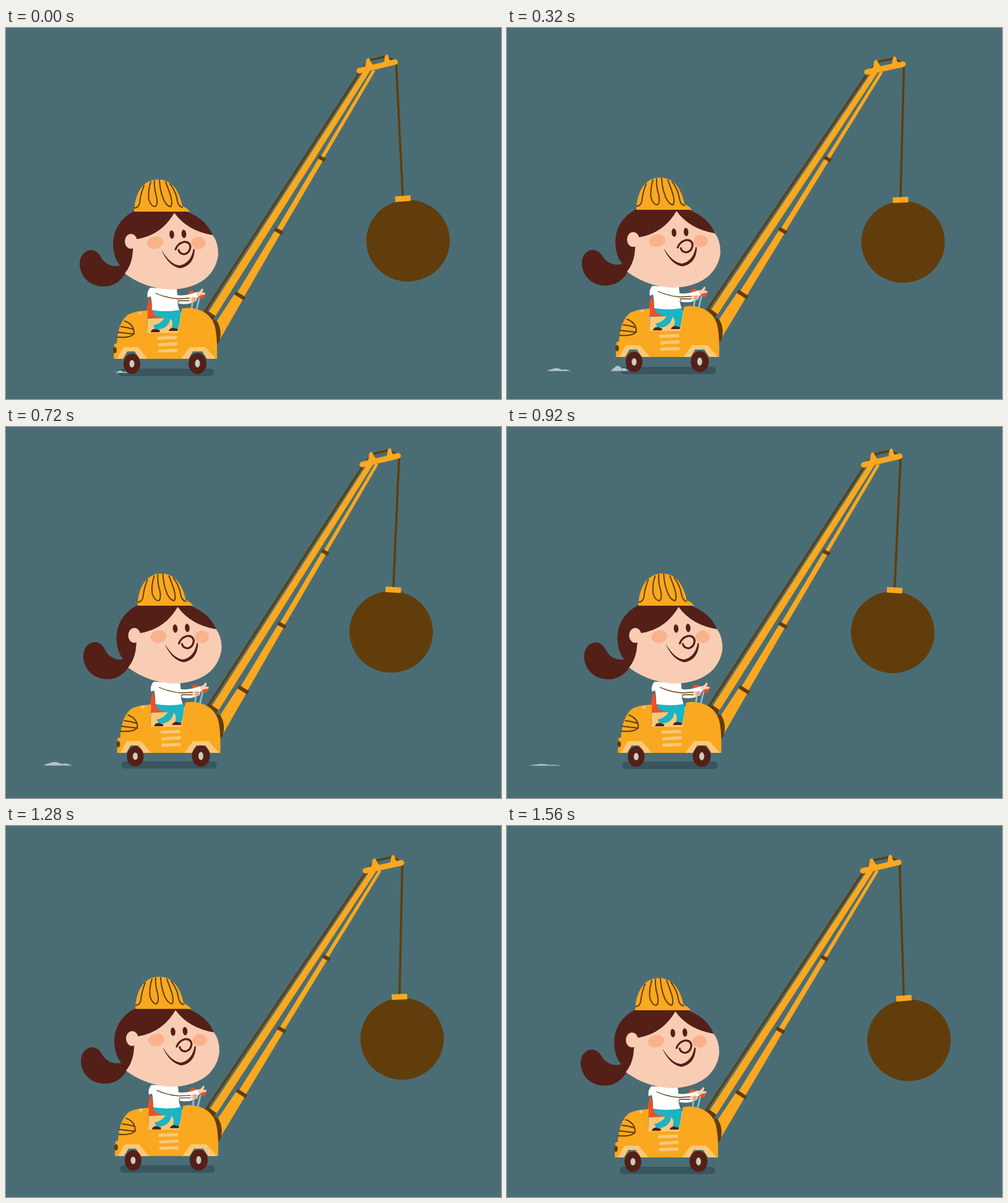
These frames come from a looping animation (800 px wide and 600 px high, 1.6 s). An HTML page:

```html
<!DOCTYPE html>
<html lang="en">
<head>
<meta charset="utf-8">
<title>Wrecking ball</title>
<style>
html, body { margin: 0; width: 100%; height: 100%; overflow: hidden; background: #4a6d75; }
svg { display: block; width: 100vw; height: 100vh; }
.y { fill: #f9a81f; }
.l { fill: #fbc879; }
.b { fill: #613d0c; }
.h { fill: #541f17; }
.s { fill: #f9cdb4; }
.c { fill: #fab18c; }
.w { fill: #fff; }
.t { fill: #1cb3c3; }
.r { fill: #ee5025; }
.bg { fill: #4a6d75; }
.line { fill: none; stroke: #613d0c; stroke-width: 2; stroke-linecap: round; stroke-linejoin: round; }
</style>
</head>
<body>
<svg viewBox="0 0 800 600">
  <rect class="bg" width="800" height="600"/>
  <rect id="shadow" x="182" y="551" width="154" height="12" rx="6" fill="#39555e"/>
  <path id="dust" fill="#b3c4c7"/>

  <path id="rope" class="line" style="stroke-width:3.5"/>
  <g id="ball">
    <ellipse class="b" rx="67.5" ry="66"/>
  </g>
  <rect id="cap" class="y" x="-12.5" y="-4.5" width="25" height="9"/>

  <g id="car">
    <g id="boom">
      <path class="line" style="stroke-width:3.5" d="M320 461L572 71L588 52L614 46L630 55"/>
      <path class="y" d="M326 461L337 468L588 70L579 68Z"/>
      <path class="y" d="M334 484L370 429L384 437L345 505L338 505Z"/>
      <path class="y" d="M373 429L435.5 326L444.5 331L384 436Z"/>
      <path class="y" d="M437 326L506.5 209L513 213L444 331Z"/>
      <path class="y" d="M508 209L592 68L597 69L512.5 213Z"/>
      <path class="line" style="stroke-width:6;stroke-linecap:butt" d="M370 428L386 438M434 325L447 332M505 208L516 214"/>
      <path class="line" style="stroke-width:8;stroke-linecap:butt" d="M323 460L336 469"/>
      <path d="M571 69L629 55" fill="none" stroke="#f9a81f" stroke-width="9" stroke-linecap="round"/>
      <path class="y" d="M578 67Q582 60 582 52Q585 46 588 51Q590 58 597 62ZM609 60Q612 54 612 46Q615 40 618 45Q619 52 624 57Z"/>
    </g>
    <path class="b" d="M335 471L341 474Q350 489 345 507L341 512L334 500Z"/>

    <path class="r" d="M233 436Q227 444 227 469L258 470Q262 464 257 460L237 459Z"/>
    <path class="l" d="M229 470L262 469L284 460L282 493L228 493Z"/>

    <path d="M300 456L302 436M308 455L313 434" fill="none" stroke="#86bccb" stroke-width="3"/>
    <circle class="r" cx="300" cy="430" r="5.5"/>

    <path class="t" d="M236 455L281 455Q284 463 278 487L267 487Q272 475 265 470Q265 478 257 484Q249 489 241 487L238 481Q251 478 256 469Q245 468 239 463Z"/>
    <path class="h" d="M234 492Q235 486 243 487L249 489L248 492ZM263 490Q264 485 271 485L278 487L277 490Z"/>

    <path class="w" d="M233 420L276 422L277 432Q291 434 308 427L311 435Q300 441 299 445Q288 448 277 445L280 456Q259 460 236 456Q236 443 234 434L229 436Q227 427 233 420Z"/>
    <path class="line" style="stroke-width:1.3" d="M242 429Q260 437 278 438L296 437M278 444L279 441L296 441"/>
    <circle class="r" cx="316" cy="432" r="5.5"/>
    <path class="s" d="M307 428L313 426L317 421L319 423L317 428L322 428L322 431L315 432L310 435ZM297 436L304 434L309 437L307 442L300 444L297 441Z"/>
    <path class="line" style="stroke:#b86248;stroke-width:1" d="M301 438L306 437M301 441L306 440"/>

    <path class="y" d="M174 535L175 511L179 510Q181 475 198 463Q211 457 229 457L228 493L278 493Q282 474 284 454Q293 451 306 454Q327 459 335 476Q342 489 341 535Z"/>
    <path class="l" d="M179 535L190 516L213 516L229 535ZM283 535L297 516L322 516L339 535Z"/>
    <path class="bg" d="M188 537L196 523L208 523L217 537ZM294 537L302 523L317 523L326 537Z"/>
    <path class="l" d="M245 499L276 498L276 503L244 504ZM246 510L277 508L277 513L246 515ZM246 520L277 519L277 524L246 525Z"/>
    <circle class="l" cx="216" cy="461" r="2.5"/>
    <ellipse class="b" cx="176" cy="521" rx="3" ry="5"/>
    <path class="line" d="M192 474Q206 479 207 492Q205 502 180 500M186 483Q196 484 205 487M181 492L207 495"/>

    <path id="tail" class="h" d="M192 382C172 390 159 381 153 370C146 357 131 355 122 369C113 386 125 418 158 418C177 418 188 406 195 394Z"/>

    <path class="h" d="M207 296Q173 314 173 351Q174 372 184 384L192 397L225 380L334 335Q324 309 290 296Z"/>
    <path class="s" d="M272 299Q293 328 334 335Q343 346 343 366Q341 387 325 403Q304 422 265 423Q224 421 192 397Q201 386 204 370L207 342Q250 337 272 299Z"/>
    <ellipse class="s" cx="202" cy="345" rx="10" ry="12"/>
    <ellipse class="c" cx="241" cy="347" rx="13" ry="10" transform="rotate(-12 241 347)"/>
    <ellipse class="c" cx="311" cy="347.5" rx="11.5" ry="10"/>
    <ellipse class="h" cx="268" cy="334" rx="3.8" ry="6.8" transform="rotate(-5 268 334)"/>
    <ellipse class="h" cx="287.5" cy="333" rx="3.8" ry="6.8" transform="rotate(-5 287.5 333)"/>
    <path class="s" d="M274 358Q277 349 287 346Q297 345 298 354Q297 364 288 366Q280 365 279 359" style="stroke:#541f17;stroke-width:3.2;stroke-linecap:round"/>
    <path class="h" d="M252 360Q266 383 281 384Q299 380 303 357L305 358Q304 384 282 388.5Q264 386 252 361Z"/>

    <path class="y" d="M207 297C208 270 219 245 246 245C270 245 281 267 285 288Q293 291 297 297Z"/>
    <path class="line" d="M223 255Q217 270 216 283Q214 291 208 291M234 249Q229 264 231 278Q235 289 241 289Q246 286 243 272Q239 259 240 247M248 246Q249 264 255 278Q260 288 266 289Q270 285 266 271Q262 259 258 249M265 252Q275 265 277 280Q279 289 285 290"/>
  </g>

  <g id="wheels">
    <ellipse class="h" cx="203.5" cy="543" rx="13.5" ry="16.5"/>
    <ellipse cx="203.5" cy="543" rx="4" ry="6" fill="#cbcdbd"/>
    <ellipse class="h" cx="309.5" cy="542.5" rx="14.5" ry="17"/>
    <ellipse cx="309.5" cy="542.5" rx="4" ry="6.5" fill="#cbcdbd"/>
  </g>
</svg>
<script>
const LOOP = 1600, STEP = 40;
const times = [0, 320, 520, 920, 1160, 1400, 1560];
const bodyY = [0, -3, -7, -8, -6, 3, 1];
const wheelY = [0, -3, -9, -10, -5, 0, 0];
const lean = [0, 1.25, 0.08, 0.05, 0.85, 1.2, 0.55];
const ballY = [344, 346, 334, 332, 341.5, 346, 346.5];
const tailY = [0, 2, -2, -2.5, 1, -1, 1];

// each row: time, centre x, width, height
const puffs = [
  [[0, 187, 20, 4], [140, 150, 44, 10], [320, 84, 38, 5], [520, 61, 51, 3], [600, 56, 51, 0]],
  [[280, 192, 10, 2], [320, 182, 28, 9], [520, 142, 46, 11], [720, 84, 46, 6], [920, 62, 52, 3], [1000, 58, 50, 0]],
  [[1320, 170, 12, 2], [1400, 153, 8, 1], [1440, 148, 4, 0]]
];

const $ = id => document.getElementById(id);
const put = (id, value) => $(id).setAttribute('transform', value);

// smooth curve through looping keys
function curve(keys, t) {
  const n = times.length;
  const at = i => times[(i + n) % n] + LOOP * Math.floor(i / n);
  const val = i => keys[(i + n) % n];
  const slope = i => (val(i + 1) - val(i - 1)) / (at(i + 1) - at(i - 1));
  let i = n - 1;
  while (times[i] > t) i--;
  const d = at(i + 1) - at(i), u = (t - at(i)) / d, v = 1 - u;
  return val(i) * (1 + 2 * u) * v * v + val(i + 1) * (3 - 2 * u) * u * u
    + d * (slope(i) * u * v * v - slope(i + 1) * u * u * v);
}

function puff(rows, t, drop) {
  const i = rows.findIndex((r, k) => k < rows.length - 1 && t >= r[0] && t < rows[k + 1][0]);
  if (i < 0) return '';
  const a = rows[i], b = rows[i + 1], u = (t - a[0]) / (b[0] - a[0]);
  const [x, w, h] = [1, 2, 3].map(k => a[k] + (b[k] - a[k]) * u);
  const y = 557.8 + drop;
  return `M${x - w / 2} ${y}Q${x - w * 0.4} ${y - h * 0.5} ${x - w * 0.3} ${y - h * 0.6}` +
    `Q${x - w * 0.1} ${y - h * 1.4} ${x + w * 0.13} ${y - h * 0.4}` +
    `Q${x + w * 0.3} ${y - h * 0.8} ${x + w / 2} ${y}Z`;
}

function draw(t) {
  const wave = Math.cos(2 * Math.PI * t / LOOP);
  const dx = 2.8 * (1 - wave), dy = curve(bodyY, t), drop = curve(wheelY, t);
  const deg = curve(lean, t), a = deg * Math.PI / 180;
  put('car', `translate(${dx} ${dy})`);
  put('wheels', `translate(${dx} ${drop})`);
  put('shadow', `translate(${dx * 0.9} ${drop})`);
  put('boom', `rotate(${deg} 335 475)`);
  put('tail', `rotate(${-1.3 * curve(tailY, t)} 192 386)`);

  const ax = 630.5 - 335, ay = 57 - 475;
  const tipX = 335 + dx + ax * Math.cos(a) - ay * Math.sin(a);
  const tipY = 475 + dy + ax * Math.sin(a) + ay * Math.cos(a);
  const by = curve(ballY, t), capX = 633.5 + 8 * wave, capY = by - 68;
  const tilt = -0.5 - 4.5 * wave;
  put('ball', `translate(${635.8 + 14 * wave} ${by}) rotate(${tilt})`);
  put('cap', `translate(${capX} ${capY}) rotate(${tilt})`);
  $('rope').setAttribute('d', `M${tipX} ${tipY}L${capX} ${capY}`);
  $('dust').setAttribute('d', puffs.map(p => puff(p, t, drop)).join(''));
}

const start = performance.now();
function tick() {
  const t = (performance.now() - start) % LOOP;
  draw(Math.floor(t / STEP) * STEP);
  requestAnimationFrame(tick);
}
tick();
</script>
</body>
</html>
```
